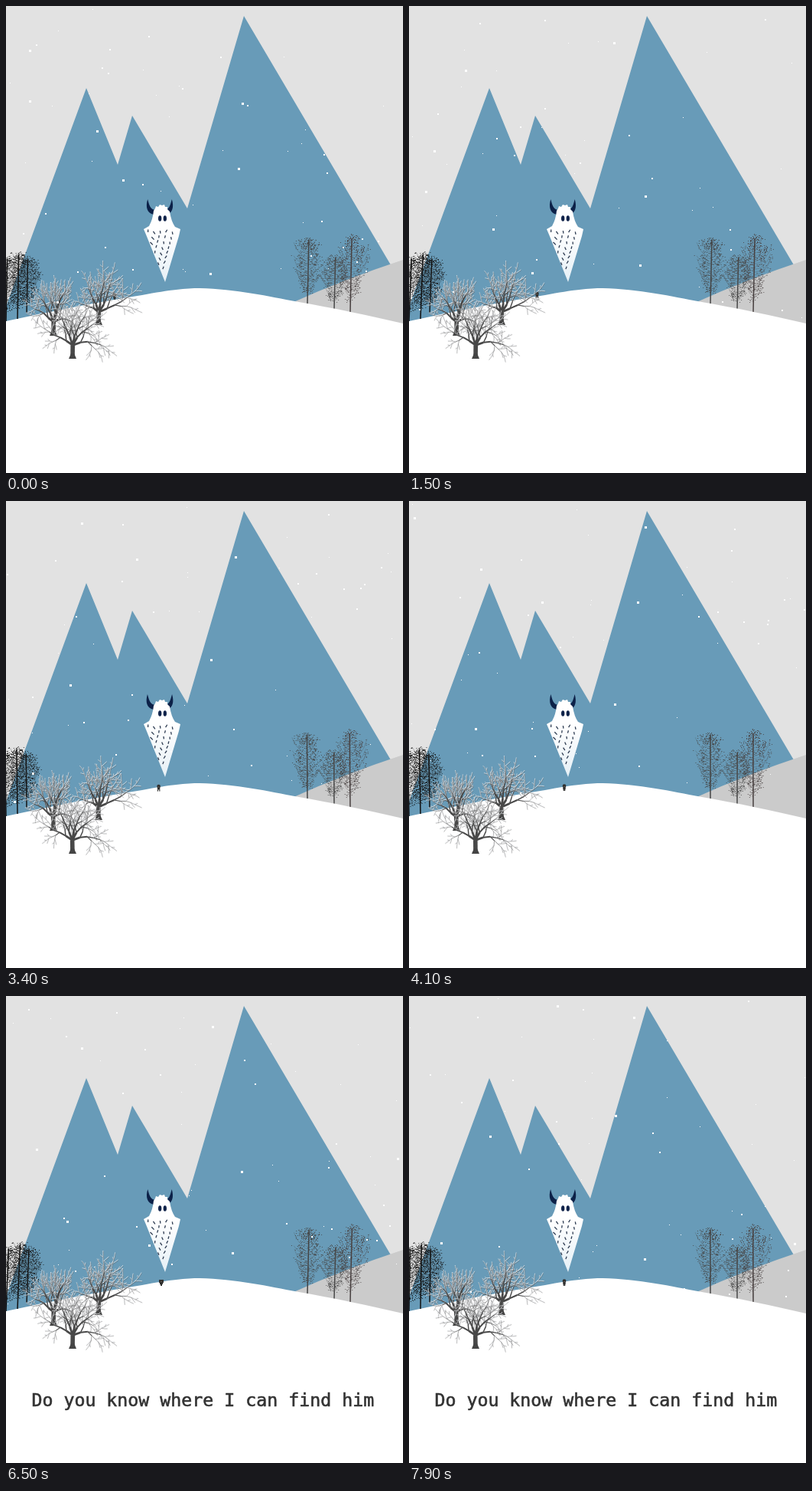
Write an HTML page with a canvas that moves like this. It is 519 px wide and 609 px high and loops after 8000 ms.

```html
<!DOCTYPE html>
<html lang="en">
<head>
<meta charset="utf-8">
<title>Snowy mountains</title>
<style>
html, body { margin: 0; width: 519px; height: 609px; overflow: hidden; background: #fff; }
canvas, svg { position: absolute; left: 0; top: 0; display: block; }
text { font: 23.25px "DejaVu Sans Mono", monospace; fill: #333; stroke: #333; stroke-width: .6px; }
</style>
</head>
<body>
<canvas id="stage" width="519" height="609"></canvas>
<svg width="519" height="609"><text id="line" x="33.4" y="535">Do you know where I can find him</text></svg>
<script>
const ctx = document.getElementById('stage').getContext('2d');
const line = document.getElementById('line');
const LOOP = 8000, STEP = 100, TAU = Math.PI * 2, LEVELS = 11;

function seeded(a) {
  return () => {
    a = (a + 0x6D2B79F5) | 0;
    let v = Math.imul(a ^ (a >>> 15), 1 | a);
    v = (v + Math.imul(v ^ (v >>> 7), 61 | v)) ^ v;
    return ((v ^ (v >>> 14)) >>> 0) / 4294967296;
  };
}
const wave = (t, peak, period) => Math.cos(TAU * (t - peak) / period);

const mountains = new Path2D('M0 392L22 332L105 107L146 207L165 143L237 264L311 13L502 336L519 365V420H0Z');
const farHill = new Path2D('M374 387Q440 357 519 331V420H374Z');
const snowHill = new Path2D('M0 411C60 398 120 386 178 377C215 370 235 368 253 368C300 369 345 379 380 385.5C430 394 475 404 519 414V609H0Z');
const hornL = new Path2D('M185 252C182 262 184 270 193 272L195 266C188 265 187 259 185 252Z');
const hornR = new Path2D('M217 252C220 262 218 270 210 272L208 266C214 265 215 259 217 252Z');
const body = new Path2D('M180 291L187 287Q192 278 193 267L195 264L196 261L199 262L201 259L204 260L207 259L208 262L211 262L211 265L214 268Q216 281 221 288L228 291L226 300L208 360L183 298Z');

// Spreading crown of limbs with side twigs, fitted to a box around the trunk foot.
function oak(seed, x0, x1, top, foot, base) {
  const rnd = seeded(seed), segs = [];
  function grow(x, y, angle, len, level, side) {
    const ex = x + Math.sin(angle) * len, ey = y - Math.cos(angle) * len;
    segs.push([x, y, ex, ey, level]);
    if (level >= LEVELS - 1) return;
    const bend = (rnd() - .5) * .5;
    grow(ex, ey, angle * 1.03 + bend, len * (.82 + rnd() * .12), level + 1, -side);
    if (level < LEVELS - 2)
      grow(ex, ey, angle + side * (.5 + rnd() * .5), len * (.65 + rnd() * .2), level + 2, side);
  }
  segs.push([0, 0, 0, -22, 0]);
  for (const angle of [-1.15, -.5, .2, .65, 1.2])
    grow(0, -22, angle + (rnd() - .5) * .2, 15, 2, angle < 0 ? 1 : -1);
  const xs = segs.map(s => s[2]), ys = segs.map(s => s[3]);
  const left = (foot - x0) / -Math.min(...xs), right = (x1 - foot) / Math.max(...xs);
  const rise = (base - top) / -Math.min(...ys);
  const px = x => foot + x * (x < 0 ? left : right), py = y => base + y * rise;
  const levels = Array.from({ length: LEVELS }, () => new Path2D());
  for (const [x, y, ex, ey, d] of segs) {
    levels[d].moveTo(px(x), py(y));
    levels[d].lineTo(px(ex), py(ey));
  }
  const flare = new Path2D(`M${foot - 5} ${base}L${foot - 2} ${base - 7}H${foot + 2}L${foot + 5} ${base}Z`);
  return { levels, flare, base };
}

// Slim upright tree with rising twigs.
function slim(seed, x0, x1, top, foot, base, color) {
  const rnd = seeded(seed), h = base - top;
  const trunk = new Path2D(`M${foot} ${base}L${foot + 1} ${top + h * .12}`);
  const twigs = new Path2D(), specks = new Path2D();
  for (let i = 0; i < 44; i++) {
    const v = .24 + .72 * i / 44, side = i % 2 ? 1 : -1;
    const room = side > 0 ? x1 - foot : foot - x0;
    const reach = room * Math.sin(Math.PI * Math.pow((v - .16) / .86, .9)) * (.45 + .55 * rnd());
    const y = base - h * v + 8, ex = foot + side * reach;
    const ey = Math.max(top, y - reach * (.55 + rnd() * .6));
    twigs.moveTo(foot, y);
    twigs.quadraticCurveTo(foot + side * reach * .7, y - 1, ex, ey);
    for (let k = 0; k < 10; k++) {
      const q = .25 + rnd() * .75;
      const sx = foot + side * reach * q + (rnd() - .5) * 8;
      const sy = Math.max(top, y + (ey - y) * q + (rnd() - .5) * 10);
      specks.rect(Math.round(sx), Math.round(sy), 1, 1);
    }
  }
  return { trunk, twigs, specks, base, color };
}

const darkTrees = [
  slim(3, -24, 20, 318, 0, 411, '#111'), slim(8, -4, 37, 312, 15, 408, '#111'),
  slim(5, 4, 47, 320, 27, 400, '#161616')
];
const rightTrees = [
  slim(21, 371, 415, 293, 394, 389, '#444'), slim(22, 408, 448, 318, 429, 396, '#484848'),
  slim(23, 433, 475, 290, 450, 400, '#484040')
];
const oaks = [
  oak(31, 21, 100, 352, 62, 430), oak(47, 85, 178, 333, 121, 416), oak(64, 35, 145, 380, 87, 460)
];

const rnd = seeded(77);
const flakes = Array.from({ length: 62 }, () => {
  const size = 1 + Math.floor(rnd() * 2.4);
  return { x: rnd() * 519, y: rnd() * 425, size, speed: 28 + size * 16 + rnd() * 12, drift: (rnd() - .5) * 16 };
});

function fill(path, color) { ctx.fillStyle = color; ctx.fill(path); }
function stroke(path, color, width) {
  ctx.strokeStyle = color;
  ctx.lineWidth = width;
  ctx.stroke(path);
}
// Shears around the foot, so the crown leans and the trunk stays put.
function lean(tree, k, draw) {
  ctx.save();
  ctx.transform(1, 0, -k, 1, k * tree.base, 0);
  draw(tree);
  ctx.restore();
}
function drawSlim({ trunk, twigs, specks, color }) {
  ctx.globalAlpha = .5;
  stroke(twigs, color, .5);
  ctx.globalAlpha = .8;
  fill(specks, color);
  ctx.globalAlpha = 1;
  stroke(trunk, color, 1.5);
}
function drawOak({ levels, flare }) {
  ctx.save();
  ctx.translate(-.5, -1);
  for (let d = 4; d < LEVELS; d++) stroke(levels[d], '#eef0f2', .7);
  ctx.restore();
  for (let d = LEVELS - 1; d >= 0; d--)
    stroke(levels[d], d < 6 ? '#484848' : '#606060', Math.max(.4, 5.6 * Math.pow(.71, d)));
  fill(flare, '#444');
}

function drawYeti(t) {
  ctx.save();
  const spread = 1 + .025 * wave(t, 700, 2200);
  ctx.translate(201, 0);
  ctx.scale(spread, 1);
  ctx.translate(-201, 0);
  fill(hornL, '#0c2148');
  fill(hornR, '#0c2148');
  ctx.restore();
  const shade = ctx.createLinearGradient(0, 290, 0, 360);
  shade.addColorStop(0, '#fff');
  shade.addColorStop(1, '#e6f0f6');
  fill(body, shade);
  ctx.fillStyle = '#10234a';
  for (const x of [201.2, 207.8]) {
    ctx.beginPath();
    ctx.ellipse(x, 277, 2.2, 3.8, 0, 0, TAU);
    ctx.fill();
  }
  const marks = new Path2D();
  for (let row = 0; row < 8; row++) {
    const y = 293 + row * 6.8, k = (y - 294) / 66;
    const from = 186 + 22 * k, to = 223 - 15 * k;
    for (let x = from + (row % 2) * 4; x < to; x += 8) {
      const wobble = Math.sin(x * 5 + row * 3);
      const tilt = (205 - x) * .05 + wobble;
      marks.moveTo(x - tilt, y + wobble * 1.5);
      marks.lineTo(x + tilt, y + 3.4 + wobble * 1.5);
    }
  }
  stroke(marks, '#2c3a50', 1.3);
}

function drawWalker(t) {
  const p = Math.min(t, 3600) / 3600, x = 142 + 61 * p;
  const y = x < 185 ? 381.5 - (x - 167) / 18 : 381 - (x - 185) / 6;
  const idle = t >= 3600, crouch = idle && wave(t, 450, 1000) > 0;
  ctx.fillStyle = '#30302f';
  if (crouch) {
    ctx.fillRect(x - 3, y - 8, 6, 4);
    ctx.fillRect(x - 2, y - 4, 4, 2);
    ctx.fillRect(x - 1, y - 2, 2, 2);
  } else {
    ctx.beginPath();
    ctx.arc(x, y - 6.5, 2.3, 0, TAU);
    ctx.fill();
    ctx.fillRect(x - 1.7, y - 6, 3.4, 4);
    const stride = idle ? 0 : Math.floor(t / 200) % 2;
    ctx.fillRect(x - 1.3 - stride * .5, y - 2, 1.2, 2);
    ctx.fillRect(x + .1 + stride * .5, y - 2, 1.2, 2);
  }
  ctx.fillStyle = '#8a7768';
  ctx.fillRect(x - .5, y - 6, 1, 1);
}

function drawSnow(t) {
  ctx.fillStyle = '#fff';
  for (const f of flakes) {
    const s = t / 1000;
    const x = (f.x + f.drift * s + 519) % 519, y = (f.y + f.speed * s) % 425;
    ctx.fillRect(Math.round(x), Math.round(y), f.size, f.size);
  }
}

function frame() {
  const t = Math.floor(performance.now() % LOOP / STEP) * STEP;
  const breeze = wave(t, 750, 5200), lateBreeze = wave(t, 1150, 5500);
  ctx.fillStyle = '#e2e2e2';
  ctx.fillRect(0, 0, 519, 609);
  fill(mountains, '#689bb8');
  fill(farHill, '#cbcbcb');
  rightTrees.forEach(tree => lean(tree, .018 * breeze, drawSlim));
  fill(snowHill, '#fff');
  drawYeti(t);
  drawWalker(t);
  darkTrees.forEach(tree => lean(tree, .03 * lateBreeze, drawSlim));
  oaks.forEach(tree => lean(tree, .02 * breeze, drawOak));
  drawSnow(t);
  line.style.visibility = t >= 5000 ? 'visible' : 'hidden';
  requestAnimationFrame(frame);
}
frame();
</script>
</body>
</html>
```
